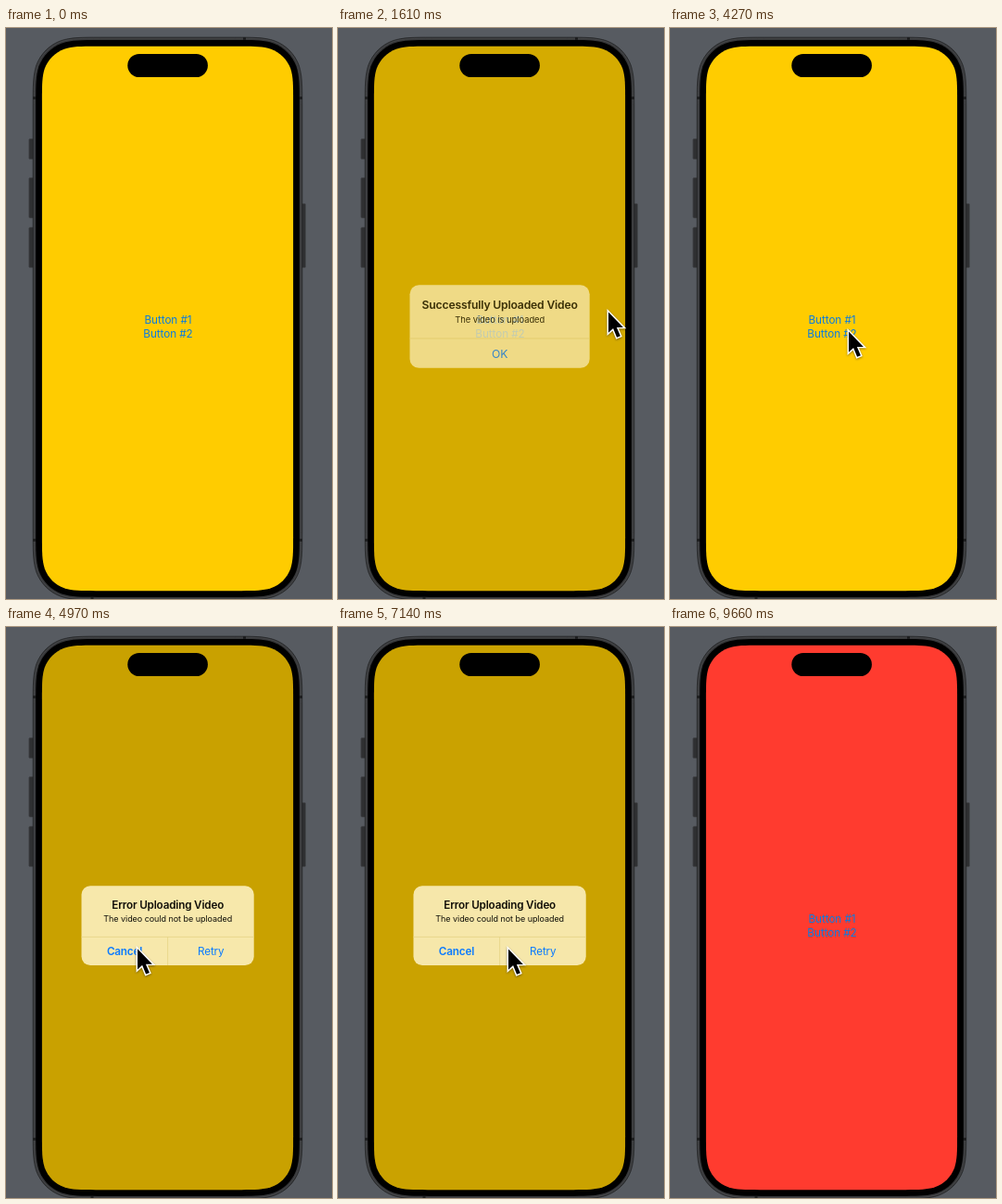
Animation, 352 px wide and 616 px high, one loop 9.94 s. Source, as an HTML page:

```html
<!DOCTYPE html>
<html lang="en">
<head>
<meta charset="utf-8">
<title>Alert demo</title>
<style>
  html, body { margin: 0; width: 100%; height: 100%; overflow: hidden; background: #575b61; }
  svg { display: block; width: 352px; height: 616px; }
  text { font-family: Inter, "Liberation Sans", sans-serif; text-anchor: middle; letter-spacing: -.015em; }
  .link { font-size: 11.7px; fill: #0a7be0; letter-spacing: -.005em; }
  .title { font-size: 11.7px; font-weight: 600; fill: #100e08; }
  .note { font-size: 9px; fill: #100e08; letter-spacing: -.005em; }
  .act { font-size: 11.7px; fill: #0a7aff; }
  .bold { font-weight: 600; }
  .rule { stroke: #e6d487; stroke-width: .8; }
</style>
</head>
<body>
<svg viewBox="0 0 352 616">
  <rect width="352" height="616" fill="#575b61"/>

  <g fill="#2f3032" stroke="#434548" stroke-width=".6">
    <rect x="24.8" y="119.5" width="6" height="22" rx="1.2"/>
    <rect x="24.8" y="161.5" width="6" height="43.5" rx="1.2"/>
    <rect x="24.8" y="215" width="6" height="43.5" rx="1.2"/>
    <rect x="318" y="189.5" width="5.5" height="69" rx="1.2"/>
  </g>
  <path id="rim" fill="#353638" stroke="#232425" stroke-width=".8"/>
  <path id="shine" fill="none" stroke="#4a4b4d" stroke-width=".8"/>
  <path d="M29 75.5h4M316 75.5h4M29 552.5h4M316 552.5h4M257.5 10v3M93 614v3" stroke="#1d1e1f" stroke-width="3"/>
  <path id="bezel"/>

  <path id="screen"/>
  <text class="link" x="175" y="318.9">Button #1</text>
  <text class="link" x="175" y="334.1">Button #2</text>
  <path id="dim"/>

  <g id="alert">
    <rect x="81.5" y="279.2" width="186.2" height="85.8" rx="9.5" fill="#f7e8ab"/>
    <path class="rule" d="M81.5 334.4h186.2"/>
    <g id="success">
      <text class="title" x="174.7" y="304.2">Successfully Uploaded Video</text>
      <text class="note" x="174.7" y="318">The video is uploaded</text>
      <text class="act" x="174.7" y="354.2">OK</text>
    </g>
    <g id="failure">
      <path class="rule" d="M174.6 334.4v30.6"/>
      <text class="title" x="174.7" y="304.2">Error Uploading Video</text>
      <text class="note" x="174.7" y="318">The video could not be uploaded</text>
      <text class="act bold" x="128" y="354.2">Cancel</text>
      <text class="act" x="221.2" y="354.2">Retry</text>
    </g>
  </g>
  <rect x="131.3" y="27.9" width="86.6" height="25.2" rx="12.6"/>

  <circle id="ring" fill="#ffa51e"/>
  <g id="cursor">
    <path d="M1 2.6V24.8L6.1 20.1L10.1 29.8L13.9 28.2L9.9 18.9H16.9Z" fill="#000" stroke="#fff" stroke-width="2.9"
      style="paint-order:stroke; filter:drop-shadow(0 1.2px 1px rgba(0,0,0,.4))"/>
  </g>
</svg>
<script>
const LOOP = 9940, STEP = 70, DIM = .21, OMEGA = 22.85;
const RED_AT = 8155;
const $ = id => document.getElementById(id);

// rounded screen outline with continuous corners, grown outwards by `grow`
function outline(grow) {
  const w = 135.6 + grow, h = 293.7 + grow, r = 38 + grow;
  const corner = [[1.529, 0], [1.088, 0], [.868, 0], [.631, .075],
    [.373, .169], [.169, .373], [.075, .631], [0, .868], [0, 1.088], [0, 1.529]];
  const place = (sx, sy) => {
    const pts = corner.map(([x, y]) => `${174.5 + sx * (w - x * r)} ${313.5 + sy * (h - y * r)}`);
    return sx * sy > 0 ? pts : pts.reverse();
  };
  return [[-1, -1], [-1, 1], [1, 1], [1, -1]].map(([sx, sy], i) => {
    const [first, ...curve] = place(sx, sy);
    return `${i ? "L" : "M"}${first}C${curve.join(" ")}`;
  }).join("") + "Z";
}
const layers = { rim: 9.7, shine: 8.5, bezel: 6.7, screen: 0, dim: 0 };
for (const id in layers) $(id).setAttribute("d", outline(layers[id]));

// time, tip x, tip y
const path = [
  [280, 352, 342], [910, 194, 314], [1190, 194, 314], [1600, 291, 304],
  [2090, 291, 304], [2850, 234, 340], [3420, 234, 340], [4200, 192, 325],
  [4480, 192, 325], [5150, 130, 349], [5960, 130, 349], [6510, 180, 326],
  [6790, 180, 326], [7140, 183, 345], [7420, 222, 346], [8960, 222, 346],
  [9660, 122, 618]
];
const clicks = [1050, 3220, 4300, 5670, 6600, 7700];
const alerts = [
  { kind: "success", open: 1483, close: 3250 },
  { kind: "failure", open: 4500, close: 5770 },
  { kind: "failure", open: 6770, close: 7755 }
];

// remaining distance of a critically damped spring
function rest(ms) {
  if (ms <= 0) return 1;
  const k = OMEGA * ms / 1000;
  return ms > 404 ? 0 : (1 + k) * Math.exp(-k);
}

function tipAt(t) {
  const i = path.findIndex(p => p[0] > t);
  if (i < 1) return null;
  const [t0, x0, y0] = path[i - 1], [t1, x1, y1] = path[i];
  const u = (t - t0) / (t1 - t0), e = u * u * (3 - 2 * u);
  return [x0 + (x1 - x0) * e, y0 + (y1 - y0) * e];
}

function drawAlert(t) {
  const a = alerts.find(a => t >= a.open && t < a.close + 404);
  const left = a ? rest(t - a.open) : 1;
  const shown = a ? (1 - left) * rest(t - a.close) : 0;
  $("dim").setAttribute("opacity", DIM * shown);
  $("alert").setAttribute("opacity", shown);
  $("alert").setAttribute("transform",
    `translate(174.6 322.1) scale(${1 + .2 * left}) translate(-174.6 -322.1)`);
  for (const kind of ["success", "failure"])
    $(kind).style.display = a && a.kind === kind ? "" : "none";
}

function drawPointer(t) {
  const tip = tipAt(t);
  $("cursor").style.display = tip ? "" : "none";
  if (tip) $("cursor").setAttribute("transform", `translate(${tip})`);

  const start = clicks.find(c => t >= c && t < c + 350);
  $("ring").style.display = start ? "" : "none";
  if (!start) return;
  const age = t - start, [x, y] = tipAt(start);
  $("ring").setAttribute("cx", x);
  $("ring").setAttribute("cy", y + 5.5);
  $("ring").setAttribute("r", 15.5 + age * .022);
  $("ring").setAttribute("opacity", .42 * (1 - age / 350));
}

function draw() {
  const t = Math.floor(performance.now() % LOOP / STEP) * STEP;
  $("screen").setAttribute("fill", t >= RED_AT ? "#ff3b2f" : "#ffcc00");
  drawAlert(t);
  drawPointer(t);
  requestAnimationFrame(draw);
}
draw();
</script>
</body>
</html>
```
